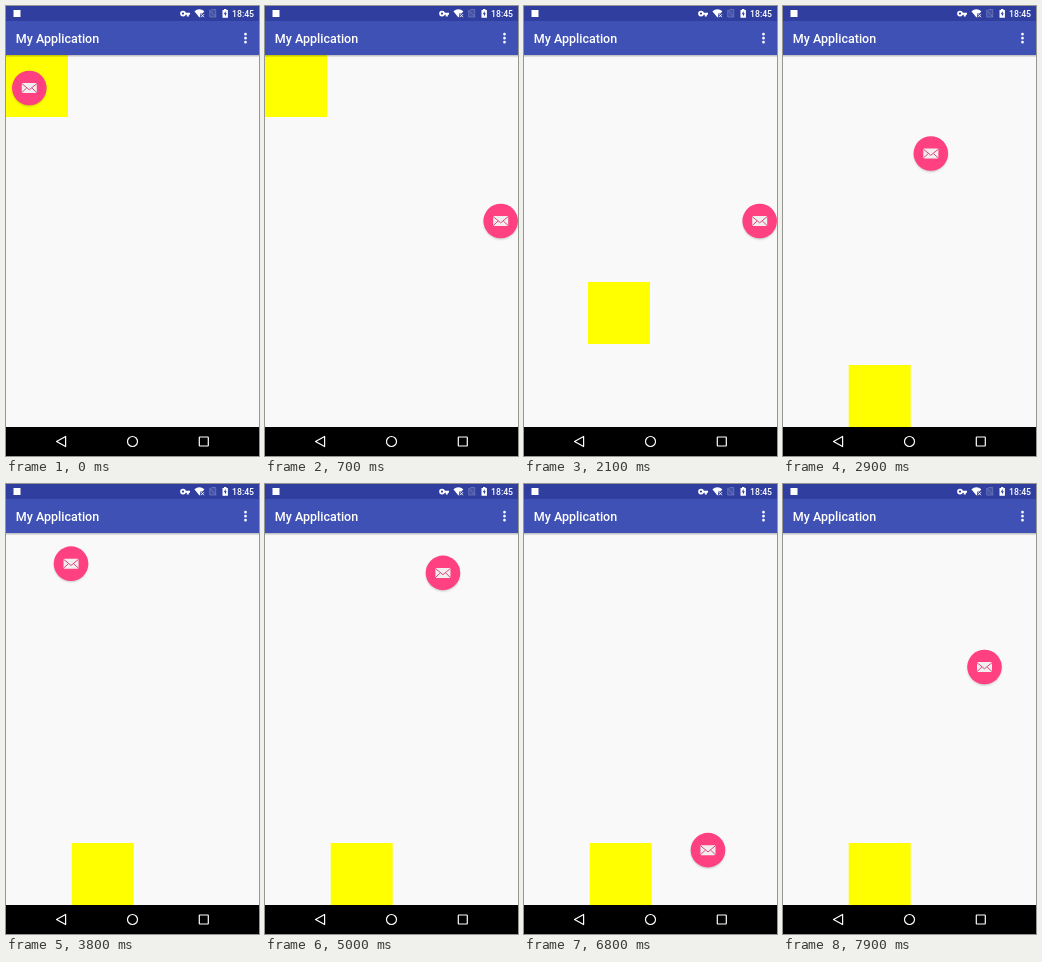
Animation of 253 by 450 pixels, one loop 8000 ms. Source, as an HTML page:

```html
<!DOCTYPE html>
<html lang="en">
<head>
<meta charset="utf-8">
<title>My Application</title>
<style>
  html, body { margin: 0; width: 100%; height: 100%; overflow: hidden; background: #f9f9f9; }
  svg { display: block; width: 100%; height: 100%; }
  text { font-family: Roboto, sans-serif; font-weight: 500; fill: #fff; }
</style>
</head>
<body>
<svg viewBox="0 0 253 450">
  <defs>
    <linearGradient id="shade" x2="0" y2="1">
      <stop stop-opacity=".27"/>
      <stop offset="1" stop-opacity="0"/>
    </linearGradient>
    <filter id="blur" x="-30%" y="-30%" width="160%" height="160%">
      <feGaussianBlur stdDeviation="1.2"/>
    </filter>
  </defs>

  <rect width="253" height="450" fill="#f9f9f9"/>
  <rect id="box" width="62" height="62" fill="#ff0"/>
  <g id="fab">
    <circle cy="1.4" r="16.8" opacity=".22" filter="url(#blur)"/>
    <circle r="17.3" fill="#ff4081"/>
    <rect x="-7.5" y="-5" width="15" height="10" rx=".8" fill="#f2eeef"/>
    <path d="M-7.5-4.4L0 1.8 7.5-4.4M-7.5 4.6L-2.6 0M7.5 4.6L2.6 0" fill="none" stroke="#dc4a7e"/>
  </g>

  <!-- App bar -->
  <rect y="49" width="253" height="2.6" fill="url(#shade)"/>
  <rect y="15" width="253" height="34" fill="#3f51b5"/>
  <text x="9.8" y="37" font-size="12.5">My Application</text>
  <path d="M239.5 28.2v0m0 4v0m0 4v0" stroke="#fff" stroke-width="2.7" stroke-linecap="round"/>

  <!-- Status bar -->
  <rect width="253" height="15" fill="#303f9f"/>
  <g fill="#fff">
    <rect x="7.5" y="4" width="7" height="7"/>
    <path d="M178 6.7h6v2h-1.2v1.7h-2v-1.7H178Z"/>
    <circle cx="177" cy="7.6" r="2" fill="none" stroke="#fff" stroke-width="1.7"/>
    <path d="M188.4 5.2q5-4 10 0l-1.8 2.2h-2.4v3l-.8 1.1Z"/>
    <path d="M195 8.2l3 3m0-3l-3 3" stroke="#fff" stroke-width=".9"/>
    <path d="M205.7 3.5h4V11h-6V5.5ZM203 3.8l7.3 7.4" fill="#4453a8" stroke="#7480bd" stroke-width=".7"/>
    <path d="M216.5 4H218V3h2.4v1h1.5v7.8h-5.4Z"/>
    <path d="M219.7 5l-2 3.2h1.3v2.4l1.8-3.3h-1.1Z" fill="#303f9f"/>
  </g>
  <text x="226" y="10.9" font-size="8.7">18:45</text>

  <!-- Navigation bar -->
  <rect y="421" width="253" height="29"/>
  <g fill="none" stroke="#fff" stroke-width="1.2" stroke-linejoin="round">
    <path d="M50.5 435.5l9.1-5.1v10.2Z"/>
    <circle cx="126.5" cy="435.5" r="5"/>
    <rect x="193.3" y="431" width="9" height="9" rx=".5"/>
  </g>
</svg>
<script>
const LOOP = 8000, STEP = 100;
const smooth = p => p * p * (3 - 2 * p);

// Each drag glides on from wherever the last one ended.
const box = { x: 0, y: 49, drags: [
  { start: 1600, end: 2100, x: 64, y: 276 },
  { start: 2100, end: 2300, x: 65.7, y: 359 }
] };
const fab = { x: 23.3, y: 82, drags: [
  { start: 0, end: 700, x: 235.7, y: 215 },
  { start: 2600, end: 3200, x: 60, y: 80 },
  { start: 3700, end: 4500, x: 177, y: 72 },
  { start: 4900, end: 5500, x: 190, y: 300 },
  { start: 5900, end: 6300, x: 180, y: 403 },
  { start: 6600, end: 7300, x: 200, y: 217 },
  { start: 7600, end: 7900, x: 201.5, y: 183 }
] };

function place(id, { x, y, drags }, t) {
  for (const d of drags) {
    const p = smooth(Math.min(1, Math.max(0, (t - d.start) / (d.end - d.start))));
    x += (d.x - x) * p;
    y += (d.y - y) * p;
  }
  document.getElementById(id).setAttribute('transform', `translate(${x} ${y})`);
}

function draw(now) {
  const t = Math.floor(now % LOOP / STEP) * STEP;
  place('box', box, t);
  place('fab', fab, t);
  requestAnimationFrame(draw);
}
draw(0);
</script>
</body>
</html>
```
